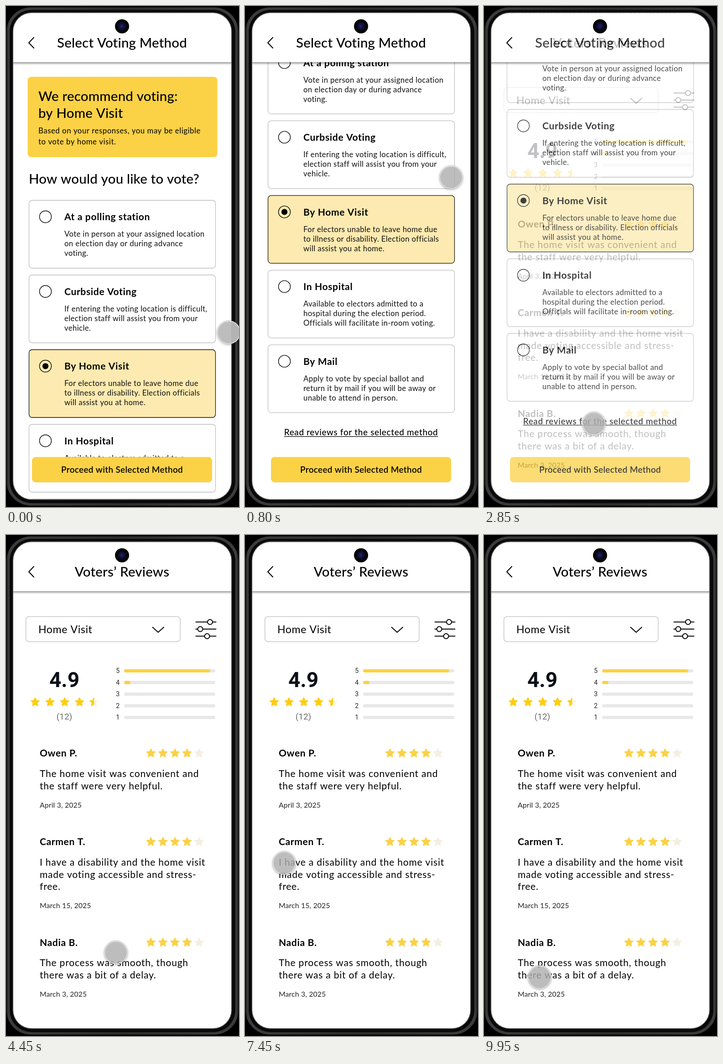
Animation, 511 px wide and 1097 px high, one loop 10000 ms. Source, as an HTML page with a canvas:

```html
<!DOCTYPE html>
<html lang="en">
<head>
<meta charset="utf-8">
<title>Voting method</title>
<style>
  html, body { margin: 0; width: 100%; height: 100%; overflow: hidden; background: #000; }
  canvas { display: block; }
</style>
</head>
<body>
<canvas id="stage" width="511" height="1097"></canvas>
<script>
const W = 511, H = 1097, LOOP = 10000, MAX_SCROLL = 362.5;
const YELLOW = '#fbd146', LINE = '#bdbdbd';
const stage = document.getElementById('stage').getContext('2d');

// weight, size, tracking in em, family
const STYLES = {
  title: [500, 29.4, 0.008, 'Lato'],
  option: [700, 21, 0.031, 'Lato'],
  body: [400, 16.8, 0.021, 'Lato'],
  note: [400, 16.8, 0.032, 'Lato'],
  button: [600, 18.9, 0.018, 'Lato'],
  link: [500, 18.9, 0.035, 'Lato'],
  menu: [400, 23.1, 0.026, 'Lato'],
  review: [400, 21, 0.038, 'Lato'],
  date: [400, 15.75, 0.01, 'Lato'],
  score: [600, 46, 0, 'Roboto'],
  count: [400, 18.9, 0, 'Roboto'],
  tick: [400, 14, 0, 'Roboto']
};

const OPTIONS = [
  ['At a polling station', 'Vote in person at your assigned location', 'on election day or during advance', 'voting.'],
  ['Curbside Voting', 'If entering the voting location is difficult,', 'election staff will assist you from your', 'vehicle.'],
  ['By Home Visit', 'For electors unable to leave home due', 'to illness or disability. Election officials', 'will assist you at home.'],
  ['In Hospital', 'Available to electors admitted to a', 'hospital during the election period.', 'Officials will facilitate in-room voting.'],
  ['By Mail', 'Apply to vote by special ballot and', 'return it by mail if you will be away or', 'unable to attend in person.']
];

const REVIEWS = [
  { y: 478, name: 'Owen P.', date: 'April 3, 2025',
    lines: ['The home visit was convenient and', 'the staff were very helpful.'] },
  { y: 672, name: 'Carmen T.', date: 'March 15, 2025',
    lines: ['I have a disability and the home visit', 'made voting accessible and stress-', 'free.'] },
  { y: 892.3, name: 'Nadia B.', date: 'March 3, 2025',
    lines: ['The process was smooth, though', 'there was a bit of a delay.'] }
];

const clamp = (v, lo = 0, hi = 1) => Math.min(hi, Math.max(lo, v));
const easeInOut = (p, n) => p < 0.5 ? (2 * p) ** n / 2 : 1 - (2 - 2 * p) ** n / 2;

// y is the middle of the capital letters
function text(c, str, x, y, style, color = '#000', align = 'left') {
  const [weight, size, tracking, family] = STYLES[style];
  c.font = `${weight} ${size}px ${family}, sans-serif`;
  c.letterSpacing = `${size * tracking}px`;
  c.textAlign = align;
  c.fillStyle = color;
  c.fillText(str, x, y + size * 0.355);
  return c.measureText(str).width;
}

function box(c, x, y, w, h, r, fill, stroke, lw = 1.3) {
  c.beginPath();
  c.roundRect(x, y, w, h, r);
  if (fill) { c.fillStyle = fill; c.fill(); }
  if (stroke) { c.strokeStyle = stroke; c.lineWidth = lw; c.stroke(); }
}

function circle(c, x, y, r, fill, stroke, lw = 1.4) {
  c.beginPath();
  c.arc(x, y, r, 0, 2 * Math.PI);
  if (fill) { c.fillStyle = fill; c.fill(); }
  if (stroke) { c.strokeStyle = stroke; c.lineWidth = lw; c.stroke(); }
}

function polyline(c, points, lw) {
  c.beginPath();
  points.forEach(([x, y]) => c.lineTo(x, y));
  c.strokeStyle = '#000';
  c.lineWidth = lw;
  c.lineCap = c.lineJoin = 'round';
  c.stroke();
}

function star(c, x, y, r, color) {
  c.beginPath();
  for (let i = 0; i < 10; i++) {
    const d = i % 2 ? r * 0.48 : r, a = i * Math.PI / 5 - Math.PI / 2;
    c.lineTo(x + d * Math.cos(a), y + d * Math.sin(a));
  }
  c.closePath();
  c.fillStyle = c.strokeStyle = color;
  c.lineWidth = 1.6;
  c.lineJoin = 'round';
  c.fill();
  c.stroke();
}

function header(c, title) {
  c.save();
  c.shadowColor = 'rgba(0,0,0,0.4)';
  c.shadowBlur = 4;
  c.shadowOffsetY = 3;
  c.fillStyle = '#fff';
  c.fillRect(10, 0, 490, 123);
  c.restore();
  text(c, title, 254.5, 81, 'title', '#000', 'center');
  polyline(c, [[61, 69], [50, 80.5], [61, 92]], 2);
}

function optionCard(c, [title, ...lines], y, selected) {
  box(c, 50.5, y, 409, 148.5, 7, selected ? '#fdeab0' : '#fff', selected ? '#111' : LINE);
  circle(c, 86.5, y + 36, 13, null, '#000');
  if (selected) circle(c, 86.5, y + 36, 6.6, '#000');
  text(c, title, 128, y + 36.5, 'option');
  lines.forEach((line, i) => text(c, line, 128, y + 74 + 21 * i, 'body', '#111'));
}

function methodPage(c, scroll) {
  c.fillStyle = '#fff';
  c.fillRect(0, 0, W, H);
  c.save();
  c.translate(0, -scroll);
  box(c, 47.5, 155, 416, 176, 8, YELLOW);
  text(c, 'We recommend voting:', 71, 197.5, 'title');
  text(c, 'by Home Visit', 71, 234.5, 'title');
  text(c, 'Based on your responses, you may be eligible', 71, 273.3, 'note');
  text(c, 'to vote by home visit.', 71, 296.8, 'note');
  text(c, 'How would you like to vote?', 50, 379, 'title');
  OPTIONS.forEach((option, i) => optionCard(c, option, 425.5 + 163.5 * i, i === 2));
  const width = text(c, 'Read reviews for the selected method', 254.5, 1271.3, 'link', '#000', 'center');
  c.fillRect(254.5 - width / 2, 1279.6, width, 1.3);
  c.restore();
  box(c, 57, 987.5, 395, 55.5, 8, YELLOW);
  text(c, 'Proceed with Selected Method', 254.5, 1015.5, 'button', '#000', 'center');
  header(c, 'Select Voting Method');
}

function ratingSummary(c) {
  text(c, '4.9', 128, 316.5, 'score', '#0d0f18', 'center');
  for (let i = 0; i < 4; i++) star(c, 64 + 32.4 * i, 366, 9.8, '#ffcc12');
  star(c, 193, 366, 9.8, '#fdf5d8');
  c.save();
  c.beginPath();
  c.rect(180, 350, 13, 30);
  c.clip();
  star(c, 193, 366, 9.8, '#ffcc12');
  c.restore();
  text(c, '(12)', 128, 397, 'count', '#6c6c6c', 'center');
  [188.5, 14, 0, 0, 0].forEach((length, i) => {
    const y = 297.5 + 25.5 * i;
    text(c, String(5 - i), 245.3, y, 'tick', '#222', 'center');
    box(c, 259, y - 3.5, 200, 7, 3.5, '#e8e8e8');
    if (length) box(c, 259, y - 3.5, length, 7, 3.5, YELLOW);
  });
}

function reviewsPage(c) {
  c.fillStyle = '#fff';
  c.fillRect(0, 0, W, H);
  box(c, 43.6, 178.6, 338.4, 55, 7, '#fff', LINE);
  text(c, 'Home Visit', 71, 207, 'menu');
  polyline(c, [[321.5, 202], [333.7, 213], [346, 202]], 2);
  [[447.5, 190.5], [426, 206], [441, 221.5]].forEach(([x, y]) => {
    polyline(c, [[416.5, y], [460.5, y]], 2);
    circle(c, x, y, 5.5, '#fff', '#000', 2);
  });
  ratingSummary(c);
  for (const { y, name, date, lines } of REVIEWS) {
    text(c, name, 74, y, 'option');
    for (let i = 0; i < 5; i++) star(c, 317.8 + 26.4 * i, y, 10, i < 4 ? '#fad248' : '#f4efe0');
    lines.forEach((line, i) => text(c, line, 74, y + 44.7 + 26.6 * i, 'review'));
    text(c, date, 74, y + 60.1 + 26.6 * lines.length, 'date', '#222');
  }
  header(c, 'Voters’ Reviews');
}

function phoneBody(c) {
  c.fillStyle = '#000';
  c.fillRect(0, 0, W, H);
  const metal = c.createLinearGradient(0, 0, W, 0);
  metal.addColorStop(0, '#161616');
  metal.addColorStop(0.012, '#3c3c3c');
  metal.addColorStop(0.5, '#2c2c2c');
  metal.addColorStop(0.988, '#3c3c3c');
  metal.addColorStop(1, '#161616');
  box(c, 1, 3, 509, 1091, 54, metal);
  box(c, 8, 8.5, 495, 1080, 48, '#090909');
  box(c, 15.5, 14.8, 479, 1065.7, 41, null, '#5a5a5a', 2);
}

function camera(c) {
  circle(c, 254.5, 44.5, 15.5, '#050507');
  const lens = c.createRadialGradient(254, 44, 0, 254, 44, 9.5);
  lens.addColorStop(0, '#26267a');
  lens.addColorStop(0.45, '#131344');
  lens.addColorStop(1, '#08081a');
  circle(c, 254.5, 44.5, 9.5, lens);
}

// time, x, y, sharpness of the ease that leads here
const POINTER = [
  [200, 488.5, 714.5, 1],
  [1155, 445.5, 314.5, 4],
  [1225, 445.5, 314.5, 1],
  [2150, 162, 993, 2.5],
  [2325, 162, 993, 1],
  [2690, 241, 914, 2.5],
  [5350, 241, 914, 1],
  [6400, 351, 549, 2.5],
  [7450, 86, 718, 2],
  [8450, 319.5, 732, 1.4],
  [8700, 374, 743, 1.4],
  [9500, 274, 955, 2],
  [9950, 122, 968, 1.4]
];

function pointerAt(t) {
  const next = POINTER.findIndex(key => key[0] > t);
  if (next <= 0) return (next ? POINTER[POINTER.length - 1] : POINTER[0]).slice(1, 3);
  const [t0, x0, y0] = POINTER[next - 1], [t1, x1, y1, sharpness] = POINTER[next];
  const p = easeInOut((t - t0) / (t1 - t0), sharpness);
  return [x0 + (x1 - x0) * p, y0 + (y1 - y0) * p];
}

function pointer(c, x, y) {
  c.save();
  c.shadowColor = 'rgba(0,0,0,0.35)';
  c.shadowBlur = 5;
  c.shadowOffsetY = 2;
  circle(c, x, y, 25.5, 'rgba(190,190,190,0.76)');
  c.restore();
  circle(c, x, y, 25.8, null, 'rgba(165,165,165,0.8)', 0.8);
  circle(c, x, y, 24.8, null, 'rgba(255,255,255,0.85)', 1.1);
}

function layer(paint) {
  const canvas = document.createElement('canvas');
  canvas.width = W;
  canvas.height = H;
  paint(canvas.getContext('2d'));
  return canvas;
}

const body = layer(phoneBody);
const reviews = layer(reviewsPage);

function render(t) {
  const [x, y] = pointerAt(t);
  const scroll = t < 1225 ? clamp(712.5 - y, 0, MAX_SCROLL) : MAX_SCROLL;
  const fade = easeInOut(clamp((t - 2720) / 330), 3);
  stage.drawImage(body, 0, 0);
  // keeps the pointer light where it leaves the screen
  circle(stage, x, y, 25.5, '#c8c8c8');
  stage.save();
  stage.beginPath();
  stage.roundRect(16, 15.5, 478, 1064.5, 40);
  stage.clip();
  if (fade < 1) methodPage(stage, scroll);
  stage.globalAlpha = fade;
  if (fade > 0) stage.drawImage(reviews, 0, 0);
  stage.restore();
  camera(stage);
  pointer(stage, x, y);
}

const start = performance.now();
function tick() {
  render((performance.now() - start) % LOOP);
  requestAnimationFrame(tick);
}
tick();
</script>
</body>
</html>
```
